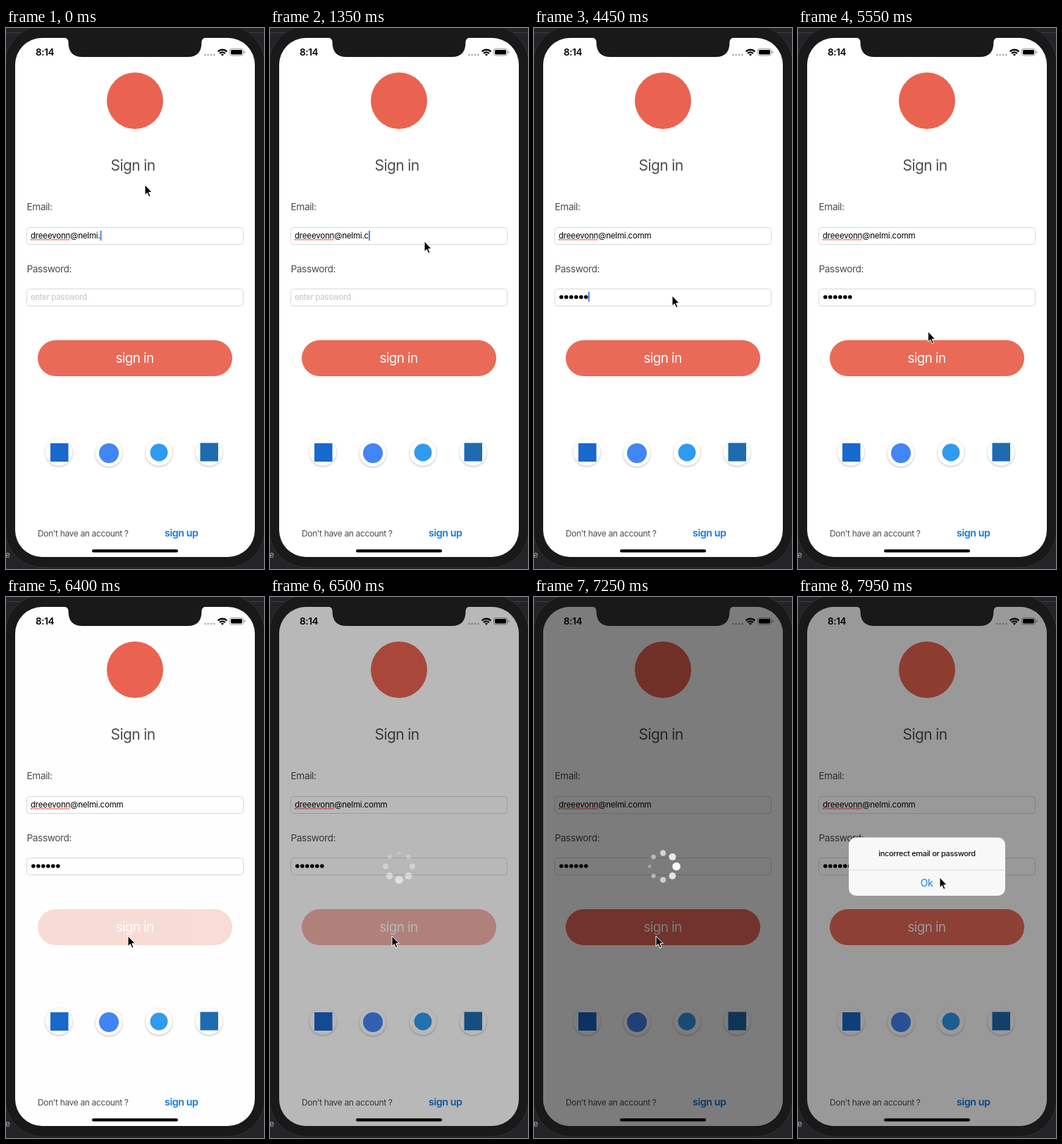
Recreate the animation shown at these times as an HTML page. Size 366 by 766 pixels, loop 8000 ms.

```html
<!DOCTYPE html>
<html lang="en">
<head>
<meta charset="utf-8">
<title>Sign in</title>
<style>
  html, body { margin: 0; width: 100%; height: 100%; overflow: hidden; background: #242428; }
  svg { display: block; width: 366px; height: 766px; }
  text { font-family: Inter, Roboto, sans-serif; letter-spacing: -.03em; fill: #4c4c4c; white-space: pre; }
  .label { font-size: 13.7px; }
  .input { font-size: 11.5px; }
  .badge { fill: #fff; filter: drop-shadow(0 1px 1.5px #0004); }
  .field { fill: #fff; stroke: #d8d8d8; }
  .caret { fill: #4277d6; }
  #email { fill: #000; letter-spacing: -.015em; }
</style>
</head>
<body>
<svg viewBox="0 0 366 766">
  <!-- desktop and phone body -->
  <rect width="366" height="766" fill="#242428"/>
  <path d="M0 6.5H366" stroke="#3a3a40"/>
  <rect x="-1" y="-3" width="368" height="767" rx="53" fill="#191919" stroke="#303030"/>
  <text x="-1" y="750" style="font-size:12px;fill:#aaa">e</text>
  <rect x="13" y="14" width="340" height="735" rx="38" fill="#fff"/>

  <!-- status bar -->
  <text x="42" y="39" style="font-size:13.5px;font-weight:600;fill:#000">8:14</text>
  <path d="M282.5 38h14" stroke="#aaa" stroke-width="2.6" stroke-linecap="round" stroke-dasharray="0 4.2"/>
  <g fill="none" stroke="#000" stroke-width="2.3">
    <path d="M300.6 33.4a9 9 0 0 1 12.8 0M303 36a5.8 5.8 0 0 1 8 0"/>
    <path d="M305 37.5a3 3 0 0 1 4 0l-2 2.2z" fill="#000" stroke="none"/>
  </g>
  <rect x="317.5" y="29.5" width="19" height="9.5" rx="2.6" fill="none" stroke="#999"/>
  <rect x="319" y="31" width="16" height="6.5" rx="1.4"/>
  <path d="M338.5 32.5v3.5" stroke="#999" stroke-width="1.4"/>

  <!-- form -->
  <circle cx="183" cy="103" r="40" fill="#ea6350"/>
  <text x="180" y="202" text-anchor="middle" style="font-size:21px">Sign in</text>
  <text class="label" x="29.5" y="258">Email:</text>
  <rect class="field" x="29.5" y="282.5" width="307" height="24" rx="4"/>
  <text class="input" id="email" x="35" y="298"></text>
  <path id="spelling" stroke="#e8402f" stroke-width="1.8" stroke-dasharray="1.6 1.2"/>
  <rect class="caret" id="emailCaret" y="287" width="1.8" height="14"/>
  <text class="label" x="29.5" y="346">Password:</text>
  <rect class="field" x="29.5" y="369.5" width="307" height="24" rx="4"/>
  <text class="input" id="placeholder" x="35" y="385" style="fill:#c4c4c7">enter password</text>
  <g id="bullets"></g>
  <rect class="caret" id="passwordCaret" y="373.5" width="1.8" height="14"/>
  <g id="button">
    <rect x="45" y="442" width="276" height="51" rx="25.5" fill="#ea6a58"/>
    <text x="182.5" y="474" text-anchor="middle" style="font-size:18.8px;fill:#fff">sign in</text>
  </g>

  <!-- sign-in providers -->
  <circle class="badge" cx="75" cy="601" r="19"/>
  <circle class="badge" cx="146" cy="602" r="19"/>
  <circle class="badge" cx="217" cy="601" r="19"/>
  <circle class="badge" cx="288" cy="601" r="19"/>
  <rect x="63" y="588" width="25.5" height="26" fill="#1968cb"/>
  <circle cx="146" cy="602" r="14" fill="#4285f4"/>
  <circle cx="217" cy="601" r="12.5" fill="#2f9bf0"/>
  <rect x="275.5" y="587.5" width="25.5" height="26" fill="#1f6bb0"/>

  <text x="45" y="720" style="font-size:12px">Don't have an account ?</text>
  <text x="225" y="720" style="font-size:14.3px;font-weight:600;fill:#147ae0">sign up</text>

  <!-- overlays -->
  <rect id="dim" x="13" y="14" width="340" height="735" rx="38"/>
  <g id="spinner" fill="#fff"></g>
  <rect x="122" y="738.3" width="122" height="4.2" rx="2.1"/>
  <path d="M82 13.5q6.500 .5 6.500 7q0 20.500 20 20.500h149q20 0 20-20.500q0-6.500 6.500-7z" fill="#191919"/>
  <g id="alert">
    <rect x="72" y="340.500" width="222" height="82.500" rx="10.500" fill="#f8f8f8"/>
    <path d="M72 386.500h222" stroke="#dcdcdc"/>
    <text x="183" y="367" text-anchor="middle" style="font-size:11px;font-weight:500;fill:#111">incorrect email or password</text>
    <text x="182.500" y="410" text-anchor="middle" style="font-size:14px;fill:#147efb">Ok</text>
  </g>
  <path id="pointer" d="M0 0V14.500L3.300 11.500L5.700 17L8 16L5.700 10.700H10.200Z" stroke="#fff"/>
</svg>

<script>
const LOOP = 8000;
const NAME = "dreeevonn", START = NAME + "@nelmi.", ENDING = "comm";
const EMAIL_KEYS = [1300, 1600, 1900, 2100];
const PASSWORD_KEYS = [3500, 3650, 3800, 3980, 4150, 4300];
const FOCUS_CHANGE = 3000;
const POINTER = [[0, 197, 222], [600, 197, 222], [1250, 219, 302], [2300, 219, 302],
  [2850, 196, 379], [5200, 196, 379], [5900, 173, 480], [7450, 173, 480], [7850, 201, 397], [LOOP, 201, 397]];
const DIM = [[0, 0], [6390, 0], [6600, .515], [7300, .515], [7550, .4], [LOOP, .4]];
const SPINNER = [[0, 0], [6390, 0], [6600, 1], [7300, 1], [7450, 0], [LOOP, 0]];
const BUTTON = [[0, 1], [6200, 1], [6350, .23], [6400, .23], [6650, 1], [LOOP, 1]];
const ALERT = [[0, 0], [7350, 0], [7550, 1], [LOOP, 1]];

const $ = id => document.getElementById(id);
const set = (el, attrs) => { for (const k in attrs) el.setAttribute(k, attrs[k]); };
const addCircles = (id, count) => Array.from({ length: count }, () =>
  $(id).appendChild(document.createElementNS("http://www.w3.org/2000/svg", "circle")));
const bullets = addCircles("bullets", 6);
const balls = addCircles("spinner", 8);
bullets.forEach((b, i) => set(b, { cx: 38.800 + 7 * i, cy: 381, r: 2.8 }));

// Eased value of a keyframe track; column selects which value to read.
function track(keys, t, column = 1) {
  const next = Math.max(1, keys.findIndex(k => k[0] > t));
  const a = keys[next - 1], b = keys[next];
  const u = (t - a[0]) / (b[0] - a[0]);
  return a[column] + (b[column] - a[column]) * u * u * (3 - 2 * u);
}

const pressed = (keys, t) => keys.filter(k => k <= t).length;

function caretOn(t, keys) {
  const justTyped = keys.some(k => t >= k && t < k + 500);
  return justTyped || t % 1000 < 200 || t % 1000 >= 600;
}

function drawForm(t) {
  const email = $("email");
  email.textContent = START + ENDING.slice(0, pressed(EMAIL_KEYS, t));
  set($("spelling"), { d: `M35 299.700h${email.getSubStringLength(0, NAME.length)}` });
  set($("emailCaret"), {
    x: 35 + email.getComputedTextLength(),
    opacity: +(t < 2700 && caretOn(t, EMAIL_KEYS))
  });

  const typed = pressed(PASSWORD_KEYS, t);
  set($("placeholder"), { opacity: +!typed });
  bullets.forEach((b, i) => set(b, { opacity: +(i < typed) }));
  set($("passwordCaret"), {
    x: 35 + 7 * typed,
    opacity: +(t >= FOCUS_CHANGE && t < 7350 && caretOn(t, PASSWORD_KEYS))
  });
  set($("button"), { opacity: track(BUTTON, t) });
}

function drawSpinner(t) {
  const peak = .7 + 8 * (t - 7100) / 1000;
  balls.forEach((ball, i) => {
    const gap = (((i - peak) % 8) + 8) % 8;
    const strength = 1 - Math.min(gap, 8 - gap) / 4;
    const angle = i * Math.PI / 4;
    set(ball, {
      cx: 183 + 19 * Math.sin(angle), cy: 381.5 - 19 * Math.cos(angle),
      r: 5.8 * (.4 + .6 * strength), opacity: .3 + .7 * strength
    });
  });
  set($("spinner"), { opacity: track(SPINNER, t) });
}

function draw(t) {
  drawForm(t);
  drawSpinner(t);
  set($("dim"), { opacity: track(DIM, t) });
  const shown = track(ALERT, t), scale = 1.15 - .15 * shown;
  set($("alert"), {
    opacity: shown,
    transform: `translate(183 381.5) scale(${scale}) translate(-183 -381.5)`
  });
  set($("pointer"), { transform: `translate(${track(POINTER, t, 1)} ${track(POINTER, t, 2)})` });
}

const began = performance.now();
function tick() {
  draw((performance.now() - began) % LOOP);
  requestAnimationFrame(tick);
}
tick();
</script>
</body>
</html>
```
